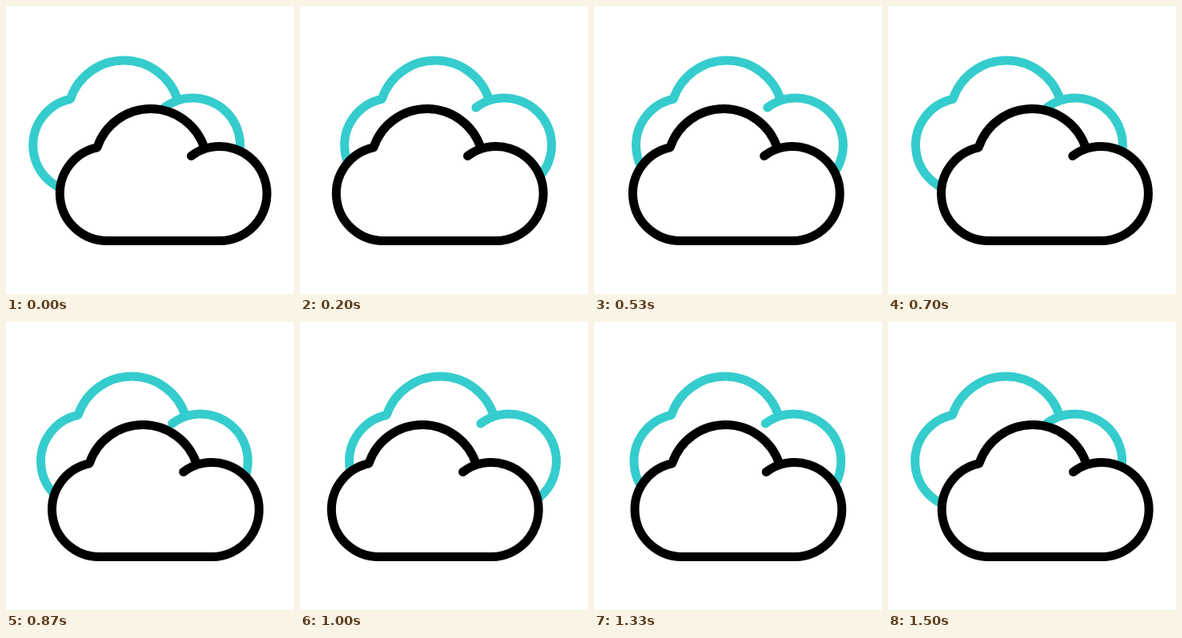
An HTML page that plays this animation: 360 by 360 pixels, repeating every 1670 ms.

```html
<!DOCTYPE html>
<html lang="en">
<head>
<meta charset="utf-8">
<title>Drifting clouds</title>
<style>
  html, body { margin: 0; height: 100%; overflow: hidden; background: #fff; }
  svg { display: block; width: 100vw; height: 100vh; }
</style>
</head>
<body>
<svg viewBox="0 0 360 360">
  <defs>
    <path id="cloud" fill="#fff" stroke-width="11" stroke-linecap="round" stroke-linejoin="round"
      d="M231.5 187.5A59 59 0 1 1 266.5 293.5H126.5A59 59 0 0 1 114 176.8A70.5 70.5 0 0 1 248 177.5"/>
  </defs>
  <use id="back" href="#cloud" stroke="#35cccd"/>
  <use id="front" href="#cloud" stroke="#000"/>
</svg>
<script>
  const LOOP = 1670, STEP = 1000 / 30;
  const turns = [1, 10, 22, 34, 45]; // steps at which the clouds rest or reverse
  const back = document.getElementById('back');
  const front = document.getElementById('front');
  const smooth = p => p * p * (3 - 2 * p);

  // 0 = resting pose, 1 = clouds fully swapped
  function swing(step) {
    const s = Math.min(Math.max(step, turns[0]), turns[4]);
    const i = Math.max(0, turns.findIndex(t => t >= s) - 1);
    const p = smooth((s - turns[i]) / (turns[i + 1] - turns[i]));
    return i % 2 ? 1 - p : p;
  }

  function draw() {
    const time = performance.now() % LOOP;
    const k = swing(Math.floor((time + 3.4) / STEP));
    back.setAttribute('transform', `translate(${-33.5 + 37.5 * k} -60.5)`);
    front.setAttribute('transform', `translate(${-37.7 * k} 0)`);
    requestAnimationFrame(draw);
  }
  draw();
</script>
</body>
</html>
```
